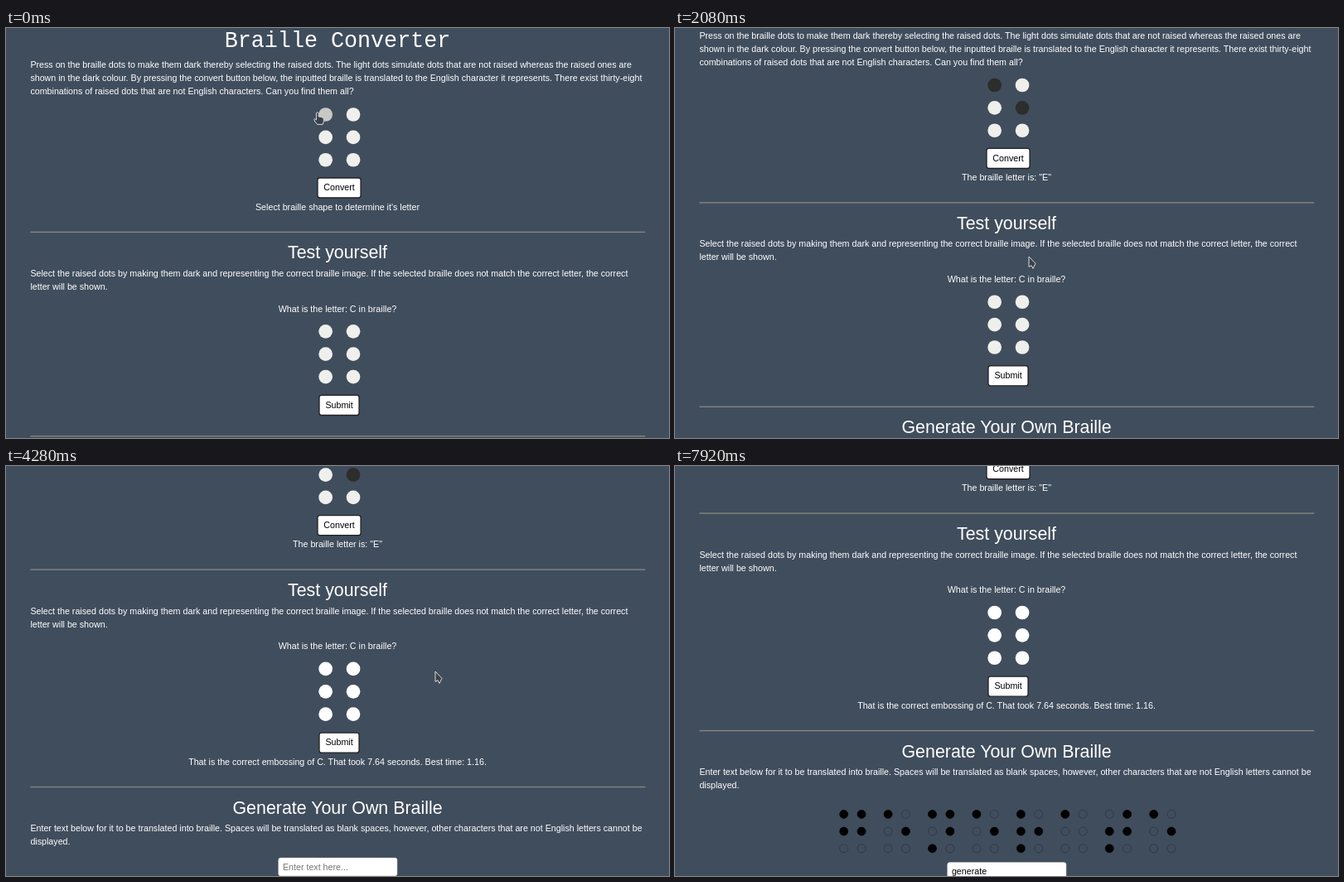
Write an HTML page that moves like this. It is 800x495 px and loops after 8600 ms.

```html
<!DOCTYPE html>
<html lang="en">
<head>
<meta charset="utf-8">
<title>Braille Converter</title>
<style>
  html, body { margin: 0; width: 100%; height: 100%; overflow: hidden; background: #404d5d; }
  #stage { position: absolute; left: 0; top: 0; width: 800px; height: 495px; overflow: hidden; }
  #zoom { position: absolute; width: 1198px; height: 742px; transform: scale(.6678); transform-origin: 0 0; }
  #page, #lower, #form { position: absolute; left: 0; top: 0; width: 1198px; }
  #page { color: #fff; font: 16px/24px "Liberation Sans", Arial, sans-serif; }
  #page * { box-sizing: border-box; }
  h1, h2, p, .line, .dot, .pin, .btn, .field { position: absolute; margin: 0; white-space: nowrap; }
  h1, h2, p.mid { left: 0; width: 1198px; text-align: center; font-weight: 400; }
  h1 { font: 40px/48px "Liberation Mono", monospace; }
  h2 { font-size: 32px; line-height: 38.4px; }
  p, .line { left: 44px; }
  .line { width: 1111px; height: 2px; background: #89877f; }
  .dot { width: 25px; height: 25px; border-radius: 50%; }
  .btn { height: 38px; border: 2px solid #222; border-radius: 5px; line-height: 34px; text-align: center; }
  .field { left: 492px; top: 866px; width: 215px; height: 33px; padding: 0 7px; border: 1.5px solid #fff;
    border-radius: 4px; background: #fff; line-height: 31px; }
  .pin { width: 16px; height: 16px; border-radius: 50%; border: 1.2px solid #273240; }
  .pin.on { background: #000; border-color: #000; }
  #cursor { position: absolute; left: 0; top: 0; overflow: visible; }
  #cursor path { stroke: #dedbd2; stroke-width: 1; stroke-linejoin: round; fill: #38424e; }
  #cursor #beam { fill: none; stroke: #222; }
</style>
</head>
<body>
<div id="stage">
  <div id="zoom">
    <div id="page">
      <h1 style="top:0">Braille Converter</h1>
      <p style="top:55px">Press on the braille dots to make them dark thereby selecting the raised dots. The light dots simulate dots that are not raised whereas the raised ones are<br>shown in the dark colour. By pressing the convert button below, the inputted braille is translated to the English character it represents. There exist thirty-eight<br>combinations of raised dots that are not English characters. Can you find them all?</p>
      <div class="btn" id="convert" style="left:562px;top:270px;width:80px">Convert</div>
      <p class="mid" id="letter" style="top:312px"></p>
      <div class="line" style="top:368px"></div>
      <h2 style="top:386.5px">Test yourself</h2>
      <p style="top:432px">Select the raised dots by making them dark and representing the correct braille image. If the selected braille does not match the correct letter, the correct<br>letter will be shown.</p>
      <p class="mid" style="top:496px">What is the letter: C in braille?</p>
      <div class="btn" id="submit" style="left:565px;top:662.5px;width:74px">Submit</div>
      <p class="mid" id="result" style="top:705px">That is the correct embossing of C. That took 7.64 seconds. Best time: 1.16.</p>
      <div id="lower">
        <div class="line" style="top:736.5px"></div>
        <h2 style="top:755.5px">Generate Your Own Braille</h2>
        <p style="top:801px">Enter text below for it to be translated into braille. Spaces will be translated as blank spaces, however, other characters that are not English letters cannot be<br>displayed.</p>
        <div id="cells"></div>
        <div id="form"><div class="field" id="field"></div></div>
      </div>
    </div>
  </div>
  <svg id="cursor" width="16" height="20">
    <path id="arrow" d="M0 0V12.4L3 10.6L5 14.4L8 8.4Z"/>
    <path id="hand" d="M-1.6 .6Q0 -1.2 1.2 .6V5Q5.6 4.6 7.4 7.6V10.6L6.2 14.4H-.4L-3.8 10Q-5 8 -3.4 7.6L-1.6 9Z"/>
    <path id="beam" d="M-2 -7H2M0 -7V7M-2 7H2"/>
  </svg>
</div>
<script>
const LOOP = 8600, SCALE = .6678;
const FADE = 300, GLIDE = 340, PRESS = 120, RELEASE = 240;
const WORD = "generate", TYPE_START = 5680, KEY_GAP = 120, BLUR = 7920;
const BRAILLE = { g: "1245", e: "15", n: "1345", r: "1235", a: "1", t: "2345" };
const LIGHT = [239, 239, 236], WHITE = [255, 255, 255], DARK = [45, 45, 43], BLACK = [0, 0, 0];

// Where the pointer arrives, when, and what it uses there.
const STOPS = [
  { at: -60, x: 376, y: 102, use: "top0" },
  { at: 720, x: 417, y: 128, use: "top3" },
  { at: 1320, x: 404, y: 195, use: "convert" },
  { at: 1680, x: 474, y: 177 },
  { at: 2080, x: 427, y: 276 },
  { at: 2440, x: 386, y: 288, use: "test0" },
  { at: 2860, x: 417, y: 290, use: "test1" },
  { at: 3440, x: 414, y: 373, use: "submit" },
  { at: 4040, x: 518, y: 248 },
  { at: 5080, x: 424, y: 474, use: "field" },
  { at: 7400, x: 560, y: 512 }
];
STOPS.forEach((stop, i) => {
  stop.enter = stop.at - 160;
  stop.exit = (STOPS[i + 1]?.at ?? LOOP) - 130;
});
const visit = Object.fromEntries(STOPS.filter(s => s.use).map(s => [s.use, s]));
const ANSWER = visit.submit.at + RELEASE;

const $ = id => document.getElementById(id);
const clamp = k => Math.min(1, Math.max(0, k));
const lerp = (a, b, k) => a + (b - a) * k;
const mix = (a, b, k) => a.map((v, i) => lerp(v, b[i], k));
const rgb = c => `rgb(${c.map(Math.round)})`;
const within = (t, a, b) => t >= a && t < b;
const fade = (t, at) => clamp((t - at) / FADE);
const ease = (t, from, to) => {
  const k = clamp((t - from) / (to - from));
  return k * k * (3 - 2 * k);
};

function add(parent, cls, x, y) {
  const el = document.createElement("div");
  el.className = cls;
  el.style.left = x + "px";
  el.style.top = y + "px";
  parent.append(el);
  return el;
}

const dotGrid = top => Array.from({ length: 6 }, (_, i) =>
  add($("page"), "dot", 565 + 50 * (i % 2), top + 41 * (i >> 1)));
const topDots = dotGrid(143.5), testDots = dotGrid(535.5);

function paintDots(dots, name, light, cleared, t) {
  dots.forEach((dot, i) => {
    const stop = visit[name + i];
    const k = stop ? fade(t, stop.at) * (1 - cleared) : 0;
    dot.style.background = rgb(mix(light, DARK, k));
  });
}

function paintButton(name, t) {
  const { at, enter, exit } = visit[name], style = $(name).style;
  const k = fade(t, enter) - fade(t, exit);
  style.background = rgb(mix(WHITE, DARK, k));
  style.color = rgb(mix(BLACK, WHITE, k));
  style.outline = within(t, at + PRESS, exit + FADE) ? "1.5px solid #8f949a" : "none";
}

let shown = -1;
function paintCells(count) {
  if (count === shown) return;
  shown = count;
  $("cells").replaceChildren();
  for (let i = 0; i < count; i++) {
    const mid = 600.5 + (i - (count - 1) / 2) * 80;
    for (let n = 0; n < 6; n++) {
      const on = BRAILLE[WORD[i]].includes(n + 1);
      add($("cells"), on ? "pin on" : "pin", mid + (n < 3 ? -16 : 16) - 8, 880.5 + 31.4 * (n % 3));
    }
  }
}

function paintField(count, focused) {
  const field = $("field");
  field.textContent = count ? WORD.slice(0, count) : "Enter text here...";
  field.style.color = count ? "#000" : "#757575";
  field.style.borderColor = focused ? "#2b6cc4" : "#fff";
  field.style.boxShadow = focused ? "0 0 0 1px #2b6cc4" : "none";
  $("form").style.top = count ? "110px" : "0";
}

function paintPointer(t) {
  const i = STOPS.findLastIndex(s => s.at <= t);
  const from = STOPS[i], to = STOPS[i + 1] ?? from;
  const k = ease(t, Math.max(from.at, to.at - GLIDE), to.at);
  const used = STOPS.find(s => s.use && within(t, s.enter, s.exit))?.use;
  const kind = !used ? "arrow" : used !== "field" ? "hand" : within(t, visit.field.at, TYPE_START) ? "beam" : "arrow";
  for (const id of ["arrow", "hand", "beam"]) $(id).style.display = id === kind ? "" : "none";
  $("cursor").style.transform = `translate(${lerp(from.x, to.x, k)}px, ${lerp(from.y, to.y, k)}px)`;
}

function render(t) {
  const count = t < TYPE_START ? 0
    : Math.min(WORD.length, 1 + Math.floor((t - TYPE_START) / KEY_GAP));
  const scroll = count ? 189.3 : 76.3 * ease(t, 1790, 2400) + 60.5 * ease(t, 4040, 4400);
  const answered = t >= ANSWER, cleared = fade(t, ANSWER);

  $("page").style.transform = `translateY(${-scroll / SCALE}px)`;
  paintDots(topDots, "top", LIGHT, 0, t);
  paintDots(testDots, "test", mix(LIGHT, WHITE, cleared), cleared, t);
  paintButton("convert", t);
  paintButton("submit", t);
  $("letter").textContent = t < visit.convert.at + RELEASE
    ? "Select braille shape to determine it's letter" : 'The braille letter is: "E"';
  $("result").style.visibility = answered ? "visible" : "hidden";
  $("lower").style.top = answered ? "24px" : "0";
  paintCells(count);
  paintField(count, within(t, visit.field.at, BLUR));
  paintPointer(t);
}

const start = performance.now();
function tick() {
  render((performance.now() - start) % LOOP);
  requestAnimationFrame(tick);
}
tick();
</script>
</body>
</html>
```
